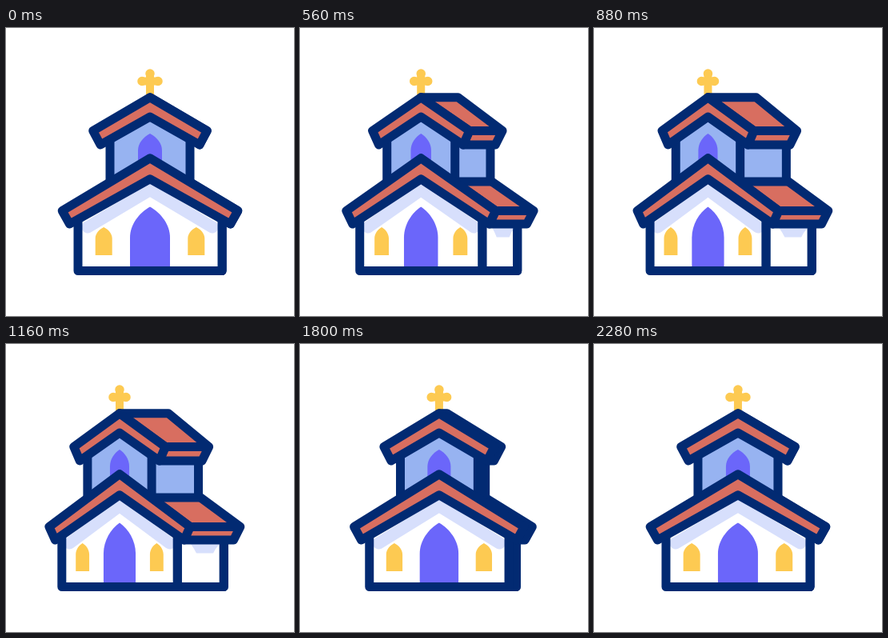
An HTML page that plays this animation: 360 by 360 pixels, repeating every 2600 ms.

```html
<!DOCTYPE html>
<html lang="en">
<head>
<meta charset="utf-8">
<title>Turning church</title>
<style>
html, body { margin: 0; width: 100%; height: 100%; overflow: hidden; background: #fff; }
svg { display: block; width: 100vw; height: 100vh; }
path { stroke-linejoin: round; stroke-linecap: round; }
</style>
</head>
<body>
<svg id="stage" viewBox="0 0 360 360"></svg>
<script>
const NAVY = '#022a72', RED = '#d86e60', BLUE = '#97b3f1', VIOLET = '#6b66fa';
const PALE = '#d7dffc', GOLD = '#fdca52', WHITE = '#fff';
const LOOP = 2600, OPEN = 220, CLOSE = 1420, TURN = 940, LINE = 11;
const stage = document.getElementById('stage');

// Steep S-curve with a long tail.
const hill = t => 1 / (1 + Math.pow(267 / t, 4.6));
const ease = t => t <= 0 ? 0 : t >= TURN ? 1 : hill(t) / hill(TURN);
const mix = (a, b, p) => a + (b - a) * p;

function layer(fill, stroke = 'none', width = LINE) {
  const el = document.createElementNS('http://www.w3.org/2000/svg', 'path');
  el.setAttribute('fill', fill);
  el.setAttribute('stroke', stroke);
  el.setAttribute('stroke-width', width);
  stage.append(el);
  return d => el.setAttribute('d', d);
}

// Layers from back to front.
const cross = layer('none', GOLD, 10);
const crossTips = layer('none', GOLD, 11.5);
const sideWall = layer(WHITE, NAVY);
const sideShade = layer(PALE);
const sideWallEdge = layer('none', NAVY);
const lowerSide = layer(RED, NAVY);
const tower = layer(BLUE, NAVY);
const towerWindow = layer(VIOLET);
const front = layer(WHITE);
const frontShade = layer('none', PALE, 15);
const door = layer(VIOLET);
const windows = layer(GOLD);
const frontEdge = layer('none', NAVY);
const lowerFront = layer(RED, NAVY);
const upperSide = layer(RED, NAVY);
const upperFront = layer(RED, NAVY);

const line = points => 'M' + points.map(q => q.join(' ')).join('L');
const shape = points => line(points) + 'Z';
const dot = (x, y) => `M${x} ${y}h.01`;
const box = (x1, y1, x2, y2) => shape([[x1, y1], [x2, y1], [x2, y2], [x1, y2]]);

function draw(p) {
  const middle = mix(180, 142, p), scale = mix(1, 0.802, p);
  const fx = offset => middle + offset * scale;

  const arch = (offset, half, top, shoulder, bottom) => {
    const l = fx(offset - half), r = fx(offset + half), c = fx(offset);
    const bend = mix(shoulder, top, 0.42), tip = mix(top, shoulder, 0.2);
    const near = half * 0.55 * scale;
    return `M${l} ${bottom}V${shoulder}C${l} ${bend} ${c - near} ${tip} ${c} ${top}` +
      `C${c + near} ${tip} ${r} ${bend} ${r} ${shoulder}V${bottom}Z`;
  };
  const gable = (half, peak, eave, base) => shape([
    [fx(-half), base], [fx(-half), eave], [fx(0), peak], [fx(half), eave], [fx(half), base]
  ]);
  const chevron = (top, inner, eave, low, wide, narrow) => shape([
    [fx(0), top], [fx(-wide), eave], [fx(-narrow), low],
    [fx(0), inner], [fx(narrow), low], [fx(wide), eave]
  ]);
  const slope = (top, eave, low, wide, narrow, ridge, far, farLow) =>
    shape([[fx(0), top], [ridge, top], [far, eave], [fx(wide), eave]]) +
    shape([[fx(wide), eave], [far, eave], [farLow, low], [fx(narrow), low]]);

  cross(line([[fx(0), 57], [fx(0), 84]]) + line([[fx(-10), 66.5], [fx(10), 66.5]]));
  crossTips(dot(fx(0), 57) + dot(fx(-10), 66.5) + dot(fx(10), 66.5));

  const wallEnd = mix(270, 272.3, p);
  const wall = box(fx(90), 238, wallEnd, 303.5);
  sideWall(wall);
  sideShade(shape([
    [mix(270, 231, p), 250], [mix(270, 267, p), 250], [mix(270, 262, p), 256],
    [mix(270, 259, p), 261.5], [mix(270, 238, p), 261.5], [mix(270, 235, p), 256]
  ]));
  sideWallEdge(wall);
  lowerSide(slope(162.7, 228.5, 245, 109.8, 100.5,
    mix(180, 203.5, p), mix(289.8, 292.8, p), mix(280.5, 284.5, p)));

  const towerEnd = mix(230, 240.5, p);
  tower(box(fx(50), 140, towerEnd, 192) + gable(50, 100, 128, 192));
  towerWindow(arch(0, 15, 132, 153, 180));

  const body = gable(90, 175, 230, 303.5);
  front(body);
  frontShade(line([[fx(-78), 249], [fx(0), 202.5], [fx(78), 249]]));
  door(arch(0, 25, 223.5, 262, 299));
  windows(arch(-57.8, 10.5, 249, 263, 284) + arch(57.8, 10.5, 249, 263, 284));
  frontEdge(body);
  lowerFront(chevron(162.7, 188.8, 228.5, 245, 109.8, 100.5));

  upperSide(slope(86.7, 128.5, 146, 71.3, 62,
    mix(180, 203, p), mix(251.3, 253.6, p), mix(242, 245, p)));
  upperFront(chevron(86.7, 111, 128.5, 146, 71.3, 62));
}

function tick(now) {
  const t = now % LOOP;
  draw(ease(t - OPEN) - ease(t - CLOSE));
  requestAnimationFrame(tick);
}
draw(0);
requestAnimationFrame(tick);
</script>
</body>
</html>
```
